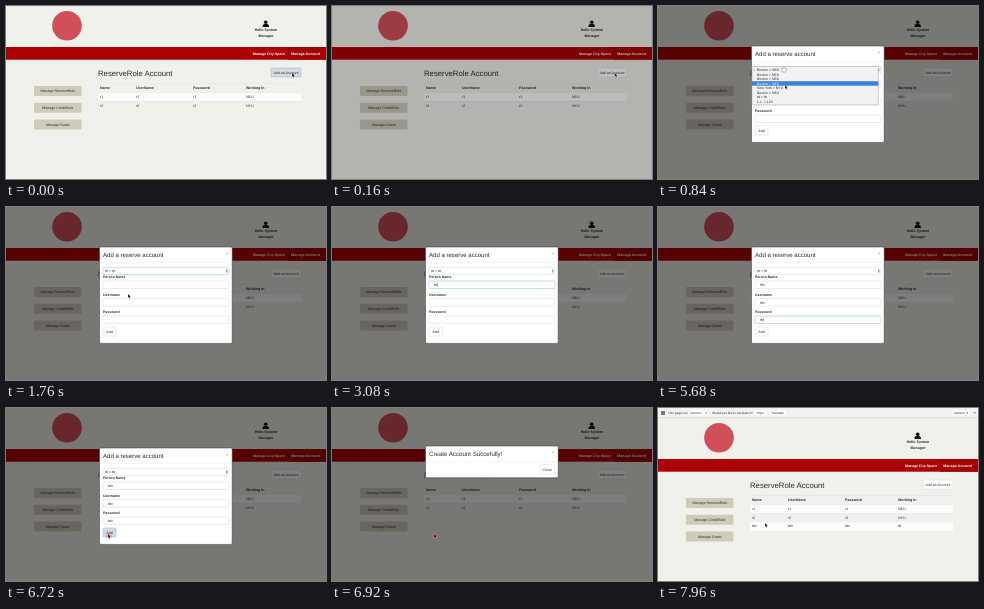
An HTML page for the animation above (8000 ms loop, 320x173 px).

```html
<!DOCTYPE html>
<html lang="en">
<head>
<meta charset="utf-8">
<title>Reserve accounts</title>
<style>
  html, body { margin: 0; height: 100%; overflow: hidden; background: #f1f0ea; }
  svg { display: block; width: 100vw; height: 100vh; }
  text { font: 3.6px "Liberation Sans", Arial, sans-serif; fill: #2b2b2b; text-rendering: geometricPrecision; white-space: pre; }
  .b { font-weight: bold; }
  .m { text-anchor: middle; }
  .w { fill: #fff; }
  .x { fill: #999; }
</style>
</head>
<body>
<svg id="stage" viewBox="0 0 320 173" preserveAspectRatio="none"></svg>
<script>
const LOOP = 8000;
const BLUE = '#66afe9';

const rect = (x, y, w, h, fill, extra = '') =>
  `<rect x="${x}" y="${y}" width="${w}" height="${h}" fill="${fill}" ${extra}/>`;
const text = (x, y, s, cls = '', size = 3.6) =>
  `<text x="${x}" y="${y}" class="${cls}" style="font-size:${size}px">${s.replace(/>/g, '&gt;')}</text>`;
const box = (id, x, y, w, h, stroke = '#ccc') =>
  rect(x, y, w, h, '#fff', `id="${id}" rx=".9" stroke="${stroke}" stroke-width=".4"`);
const line = (x, y, w, color = '#ddd') => rect(x, y, w, .4, color);
const group = (id, body) => `<g id="${id}">${body}</g>`;

const columns = [94, 130, 187, 240];
const row = (y, cells, cls = '') =>
  cells.map((s, i) => text(columns[i], y, s, cls)).join('');
const stripe = y => rect(92, y, 203, 8.8, '#fcfcfc');

const sideButton = (y, label) =>
  rect(28, y, 47.5, 10, '#cfcbb9', 'rx=".8"') + text(51.8, y + 6.3, label, 'm');

const page = group('page',
  '<circle cx="61" cy="19.8" r="14.8" fill="#d0505a"/>' +
  '<circle cx="259.7" cy="16.3" r="1.8"/><path d="M256.5 21v-1q.2-1.7 2-1.9h2.4q1.8.2 2 1.9v1z"/>' +
  text(260, 25.4, 'Hello System', 'b m') + text(260, 30.7, 'Manager', 'b m') +
  rect(0, 41, 320, 12.7, '#ad0004') + rect(282, 41, 38, 12.7, '#a30004') +
  text(247, 48.8, 'Manage City-Space', 'b w', 3.5) + text(285.3, 48.8, 'Manage Account', 'b w') +
  sideButton(80, 'Manage ReserveRole') + sideButton(96.8, 'Manage CreditRole') +
  sideButton(113.5, 'Manage Guest') +
  text(92, 69.5, 'ReserveRole Account', '', 7.75) +
  box('open', 265, 62, 30, 9) + text(280, 67.8, 'Add an Account', 'm') +
  stripe(86.3) + [77.5, 86.1, 95].map(y => line(92, y, 203)).join('') +
  row(83.2, ['Name', 'UserName', 'Password', 'Working In'], 'b') +
  row(91.9, ['r1', 'r1', 'r1', 'NEU']) + row(100.8, ['r2', 'r2', 'r2', 'NYU']) +
  group('added', line(92, 103.9, 203) + stripe(104.2) +
    row(109.3, ['tttv', 'tttv', 'tttv', 'ttt'])));

const barButton = (x, w) => box('', x, 1.8, w, 6, '#e2e2e2');
const bar = group('bar',
  rect(0, 0, 320, 10, '#f2f2f0') + line(0, 9.7, 320, '#bbb') +
  rect(3, 3, 4, 4, '#777') + text(10, 6, 'This page is in', '', 3.1) +
  barButton(30.5, 20) + text(32.2, 6, 'German', '', 3.1) + text(47.5, 6, '▾', '', 3) +
  text(54.3, 6, 'Would you like to translate it?', '', 3.1) +
  barButton(96, 13) + text(102.3, 6, 'Nope', 'm', 3.1) +
  barButton(111, 18) + text(119.6, 6, 'Translate', 'm', 3.1) +
  barButton(293, 19) + text(296, 6, 'Options', '', 3.1) + text(308.5, 6, '▾', '', 3) +
  text(315.5, 6, '×', '', 4));

const panel = (y, h) =>
  rect(93.5, y, 132.7, h, '#fff', 'rx="1.4" stroke="#333" stroke-width=".5"') +
  text(219.8, y + 8, '×', 'x', 4.5) + line(93.8, y + 15.6, 132.1, '#e5e5e5');

const fields = [
  { id: 'name', label: 'Person Name', y: 74.1, focus: 2400, keys: [2760, 2880, 3040, 3360] },
  { id: 'user', label: 'Username', y: 91.6, focus: 4000, keys: [4520, 4680, 4800, 5000] },
  { id: 'pass', label: 'Password', y: 109.1, focus: 5240, keys: [5360, 5480, 5600, 5760] }
];
const form = group('form',
  panel(40, 96.4) + text(97, 50.3, 'Add a reserve account', '', 6.05) +
  box('select', 97, 60.3, 126, 7.3) + group('choice', text(99, 65.3, 'ttt > ttt', '', 3.5)) +
  '<path d="M219.8 63.5l1-1.3 1 1.3zm0 1l1 1.3 1-1.3z" fill="#444"/>' +
  fields.map(f => text(97, f.y - 2.8, f.label, 'b', 3.5) + box(f.id, 97, f.y, 126, 7.4) +
    `<text id="${f.id}Text" x="102" y="${f.y + 5}"></text>`).join('') +
  rect(0, 0, .35, 4.2, '#222', 'id="caret"') +
  box('submit', 97, 119.9, 13, 9.2) + text(103.5, 125.7, 'Add', 'm'));

const options = ['Boston > NEU', 'Boston > NEU', 'Boston > NEU', 'Boston > NEU',
  'New York > NYU', 'Boston > NEU', 'ttt > ttt', 'L.L. > 123'];
const ROW = 4.5;
const MENU_TOP = 61.7;
const menu = group('menu',
  rect(94, 60.6, 126.3, 38.2, '#f2f2f2', 'rx="1" stroke="#999" stroke-width=".4"') +
  rect(94, 0, 126.3, ROW, '#3d82d8', 'id="mark"') + text(95.5, MENU_TOP + 3.5, '✓', '', 3) +
  options.map((s, i) => text(99, MENU_TOP + 3.5 + i * ROW, s, 'option', 3.5)).join(''));

const notice = group('notice',
  panel(38, 31.8) + text(97, 48.2, 'Create Account Succefully!', '', 6.15) +
  box('', 208, 56.8, 14.5, 9.3) + text(215.2, 62.8, 'Close', 'm'));

document.getElementById('stage').innerHTML =
  rect(0, 0, 320, 173, '#f1f0ea') + page + bar + rect(0, 0, 320, 173, '#000', 'id="shade"') +
  form + menu + notice +
  '<circle id="ring" r="2.4" fill="none" stroke="#e0544a" stroke-width=".5"/>' +
  '<path id="arrow" d="M0 0v3.9l.9-.8.6 1.4.7-.3-.6-1.4h1.3z" stroke="#fff" stroke-width=".25"/>';

const el = id => document.getElementById(id);
const optionTexts = document.querySelectorAll('.option');
const clamp = v => Math.max(0, Math.min(1, v));
const ramp = (t, a, b) => clamp((t - a) / (b - a));
const ease = v => v * v * (3 - 2 * v);
const show = (id, on) => el(id).setAttribute('opacity', +on);
const shift = (id, x, y) => el(id).setAttribute('transform', `translate(${x} ${y})`);
const outline = (id, on) => el(id).setAttribute('stroke', on ? BLUE : '#ccc');
const press = (id, on) => {
  outline(id, on);
  el(id).setAttribute('fill', on ? '#d6dade' : '#fff');
};

// Pointer stops: time, x, y
const stops = [
  [0, 286, 67], [120, 286, 67], [600, 126, 64], [680, 126, 64], [840, 127, 79], [960, 127, 79],
  [1440, 122, 91], [1600, 122, 91], [1740, 122, 87], [1800, 122, 87], [2320, 108, 78],
  [6000, 140, 104], [6560, 102, 126], [6960, 102, 126], [7400, 107, 115], [LOOP, 107, 115]
];
const clicks = [[640, 126, 64], [6680, 103, 128]];

function pointer(t) {
  const i = Math.max(1, stops.findIndex(s => s[0] > t));
  const [a, b] = [stops[i - 1], stops[i]];
  const k = ease(ramp(t, a[0], b[0]));
  return [a[1] + (b[1] - a[1]) * k, a[2] + (b[2] - a[2]) * k];
}

function draw(t) {
  const [x, y] = pointer(t);
  shift('arrow', x, y);
  show('arrow', t < 2760 || t >= 6000);

  const click = clicks.find(c => t >= c[0] && t < c[0] + 280);
  show('ring', !!click);
  if (click) shift('ring', click[1], click[2]);

  const reloaded = t >= 7680;
  const slide = 10 * ease(ramp(t, 7700, 7940));
  shift('page', 0, slide);
  shift('bar', 0, slide - 10);
  show('added', reloaded);
  press('open', t < 120);
  show('shade', reloaded ? 0 : .5 * ramp(t, 80, 240));

  const enter = ease(ramp(t, 160, 460));
  show('form', enter * (1 - ramp(t, 6740, 6860)));
  shift('form', 0, -24 * (1 - enter));
  const pop = ease(ramp(t, 6790, 6910));
  show('notice', reloaded ? 0 : pop);
  shift('notice', 0, -12 * (1 - pop));

  const picked = t >= 1640;
  show('menu', t >= 640 && !picked);
  const hover = Math.max(0, Math.min(7, Math.floor((y - MENU_TOP) / ROW)));
  el('mark').setAttribute('y', MENU_TOP + hover * ROW);
  optionTexts.forEach((o, i) => o.style.fill = i === hover ? '#fff' : '#2b2b2b');
  show('choice', picked);
  outline('select', t >= 640 && t < 2400);

  const active = t < 6600 ? fields.filter(f => t >= f.focus).pop() : null;
  for (const f of fields) {
    el(f.id + 'Text').textContent = 'tttv'.slice(0, f.keys.filter(k => t >= k).length);
    outline(f.id, f === active);
  }
  show('caret', 0);
  if (active) {
    const last = [active.focus, ...active.keys].filter(k => k <= t).pop();
    const width = el(active.id + 'Text').getComputedTextLength();
    shift('caret', 102.2 + width, active.y + 1.6);
    show('caret', (t - last) % 1000 < 500);
  }
  press('submit', t >= 6600);
}

function frame() {
  draw(performance.now() % LOOP);
  requestAnimationFrame(frame);
}
frame();
</script>
</body>
</html>
```
